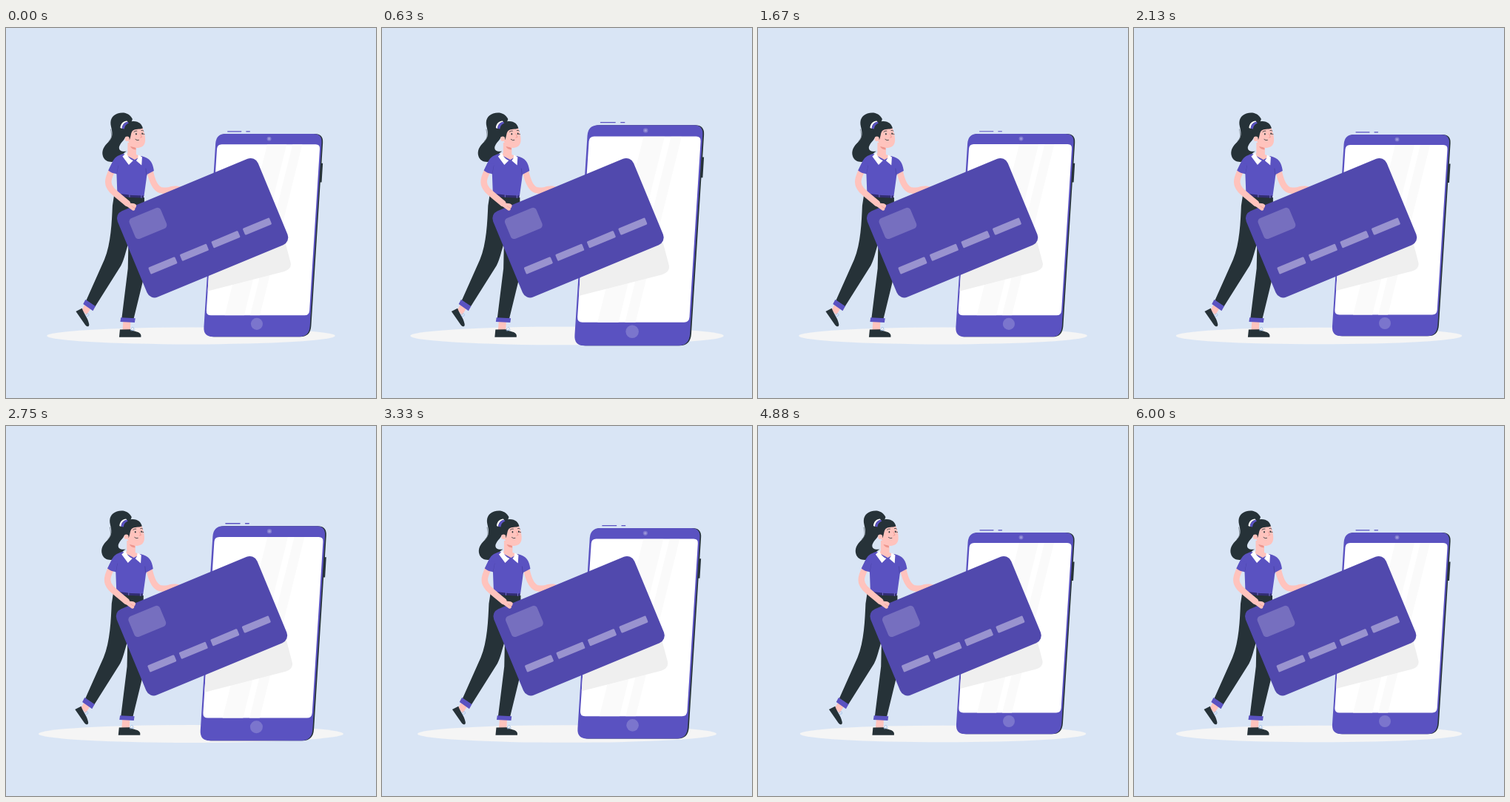
Recreate the animation shown at these times as an HTML page. Size 500x500 px, loop 6.04 s.

```html
<!DOCTYPE html>
<html lang="en">
<head>
<meta charset="utf-8">
<title>Mobile payment</title>
<style>
  html, body { margin: 0; width: 100%; height: 100%; overflow: hidden; background: #d9e5f5; }
  svg { display: block; width: 100%; height: 100%; }
  .dark { fill: #263238; }
  .violet { fill: #5a52c1; }
  .skin { fill: #ffc3bd; }
  .white { fill: #fff; }
  .line { fill: none; stroke-linecap: round; stroke-linejoin: round; }
  .ink { stroke: #263238; stroke-width: .8; }
  .lace { stroke: #9cbde8; stroke-width: .8; }
  .arm { stroke: #ffc3bd; stroke-width: 8.5; }
</style>
</head>
<body>
<svg viewBox="0 0 500 500">
  <defs>
    <path id="body" d="M297 144H415Q426.800 144 426 156L410.300 402Q409.300 416.300 396 416.300H280Q267 416.300 268 403L283.600 157Q284.500 144 297 144Z"/>
    <path id="screen" d="M292 158H418Q424 158 423.500 164L409.700 381Q409.200 387.500 403 387.500H277.500Q271 387.500 271.400 381L285.500 164Q286 158 292 158Z"/>
    <clipPath id="glass"><use href="#screen"/></clipPath>
  </defs>

  <ellipse id="floor" cx="250" cy="416" rx="193.4" ry="11.3" fill="#f5f5f5"/>

  <g id="phone">
    <path class="dark" d="M425 183.500H427.600L426 209H423.500Z"/>
    <use href="#body" x="1.6" class="dark"/>
    <use href="#body" class="violet"/>
    <path class="line" stroke="#5a52c1" stroke-width="1.2" d="M300 140.800H318M325 140.800H329.500"/>
    <use href="#screen" class="white"/>
    <g clip-path="url(#glass)">
      <path fill="#fafafa" d="M353 158H379L322 388H296ZM387 158H400L343 388H330Z"/>
      <path fill="#efefef" d="M262 338L377 289L384 315.500Q387 325 376 328.600L262 357.800Z"/>
    </g>
    <g fill="#7b75cd">
      <circle cx="355.5" cy="150.6" r="3"/>
      <circle cx="339" cy="399" r="8"/>
    </g>
    <circle cx="355.5" cy="150.6" r="1.6" fill="#9c97da"/>
  </g>

  <g id="woman">
    <path class="line arm" d="M195 195C198 208 202 217 209 219C217 221 226 219 232 218"/>
    <path class="skin" d="M216 217C223 213 231 212.500 237 215.500L236 221L216 224Z"/>

    <path class="dark" d="M171 123C167 115 159 113 151 115.500C143 118 140 125 142 133C144 141 145 148 139 153.500C132 160 129 166 131 173C133 180 140 182 147 180.500C152 178 156 171 163 166.500C157 167.500 152 166 153 160.500C155 154.500 160 152 162 146L168 132Z"/>
    <path class="line ink" stroke-opacity=".6" d="M141.600 137C143 145 144 148 139 153"/>

    <!-- legs -->
    <path class="skin" d="M107 373L114.500 379L109 388L102.500 381ZM158.500 396H168.500L168 409H157.500Z"/>
    <path class="dark" d="M146 227L187 229L187 334L172.500 393.500L156.500 392L164.800 325L165.500 291C162 301 160 312 155.500 321L120.500 376.500L108.500 368L133 313C142 291 143 262 144 240Z"/>
    <path class="violet" d="M107.500 367L121 376L117.500 382.300L104.300 373ZM155.300 391.300L174.800 392.300L174 398L154.500 397Z"/>
    <path class="dark" d="M94.500 383L102.800 378.800C105 386 110.500 391 112.300 400C113 404 109.500 404.500 107 401ZM154 407.500L168 407.300C173 411 181 409.500 182.500 415V417.800H153Z"/>
    <path class="line lace" d="M108 388C109 384 113 386 112 388.500L109 390M169 409C168 404 173 403 173 406.500L170 409L174 408"/>

    <!-- torso -->
    <path class="skin" d="M164.500 155H176L176 171L181 173L174 181L161 173L164.500 169Z"/>
    <path fill="#ed968e" d="M168 160L175.500 161.500L175.600 164.500Q170 164 168 160Z"/>
    <path class="violet" d="M159 170C150 172 146 176 143.500 182L138.500 192.500L149.500 197L150.500 224Q168 229 186.500 227.500L189.500 206L190.500 198L200 193C198 181 195 176 183 173L174 178Z"/>
    <path class="line" stroke="#453e9c" stroke-width=".7" d="M149.500 197L151.500 186M190 199L189 190"/>
    <path fill="#322d72" d="M150.500 223.500Q168 226.500 186.300 226.500L186 229.500Q166 229.300 149.500 226.800Z"/>
    <path class="line" stroke="#7770cb" stroke-width="1" d="M167 225.500V228.500M183 226V229.500"/>
    <path class="white" d="M163 168.500L157.500 173.500L166 185L172 179C167 177 164 173 163 168.500ZM179 171.500L184 174.500L183.300 185.500L176 179.300Q179 176 179 171.500Z"/>

    <!-- head -->
    <path class="skin" d="M165 138L184.500 135C187 140 189 149 188 154C187 160 182 162 177 162C170 161 166 157 165 151Z"/>
    <path class="dark" d="M161 147C157 137 161 128 171 126C179 125.300 184 130 185 135.500C180 137.500 175 135.500 171 139C168.500 142 169 147 167 151Z"/>
    <ellipse class="skin" cx="163.800" cy="149.700" rx="3" ry="3.300"/>
    <path class="white" d="M154.500 135C155 129 159 125.500 163.500 125.500L164.500 126.800C160 127.500 157 131 156.800 136Z"/>
    <path class="violet" d="M156.800 135.800C157 131 160.500 127.300 164.500 126.800L166 128.500C162 130 160.500 133 160 136.500Z"/>
    <ellipse class="dark" cx="176" cy="143.300" rx=".8" ry="1.300"/>
    <ellipse class="dark" cx="184.200" cy="142.800" rx=".8" ry="1.300"/>
    <path class="line ink" d="M173 140.300Q175 138.500 177 139M183 138.500Q185 137.500 186 139M175 150.500Q177 152.500 179.500 151.500M185 143L187 143.500"/>
    <path class="line" stroke="#ed968e" stroke-width=".8" d="M181.500 143L183.600 147.500L181.500 148"/>

    <g transform="translate(265.700 270.200) rotate(-22.500)">
      <rect x="-102.800" y="-63" width="205.600" height="126" rx="11" fill="#5149ad"/>
      <rect x="-88.700" y="-49" width="46" height="30" rx="5" fill="#766fbf"/>
      <g id="bars" fill="#9993cf"></g>
    </g>

    <path class="line arm" stroke-linecap="butt" d="M143 193C136.500 206 137 212 143 219C149 225 157 231 164 237"/>
    <path class="violet" d="M143.500 182L138.300 192.500Q143 196.500 149.500 197L152 184Z"/>
    <path class="skin" d="M159 234.500L166 237C171 236.500 174 237 176.300 239.300Q176.500 242 174.500 243.500Q174.500 247.500 171 246.500L162 240Z"/>
    <path class="line" stroke="#ed968e" stroke-width=".6" d="M170 241L174.500 243.500"/>
  </g>
</svg>
<script>
  const $ = id => document.getElementById(id);
  const LOOP = 6040, FPS = 24, CYCLE = 6;

  $('bars').innerHTML = [-69, -23, 23, 69].map(x =>
    `<rect x="${x - 19.5}" y="21.5" width="39" height="9.6" rx="1.5"/>`).join('');

  // Keys are [percent, value] pairs joined by straight lines.
  const pulse = [[0, 1], [10, 1.1], [30, 1], [40, 1], [50, 1.1], [60, 1], [100, 1]];
  const shake = [0, -1, 2, -4, 4, -4, 4, -4, 2, -1, 0].map((x, i) => [i * 10, x]);

  function at(keys, p) {
    const i = Math.max(1, keys.findIndex(k => k[0] >= p));
    const [p0, a] = keys[i - 1], [p1, b] = keys[i];
    return a + (b - a) * (p - p0) / (p1 - p0);
  }

  const scaleAbout = (x, y, s) => `translate(${x} ${y}) scale(${s}) translate(${-x} ${-y})`;

  function draw(now) {
    const step = Math.floor((now % LOOP + 2) * FPS / 1000);
    const p = Math.min(100, (step + 1) / FPS / CYCLE * 100);
    const s = at(pulse, p);
    $('floor').setAttribute('transform', scaleAbout(250, 416, s));
    $('phone').setAttribute('transform', scaleAbout(348, 279.5, s));
    $('woman').setAttribute('transform', `translate(${at(shake, p)} 0)`);
  }

  let start;
  function tick(now) {
    start ??= now;
    draw(now - start);
    requestAnimationFrame(tick);
  }
  draw(0);
  requestAnimationFrame(tick);
</script>
</body>
</html>
```
